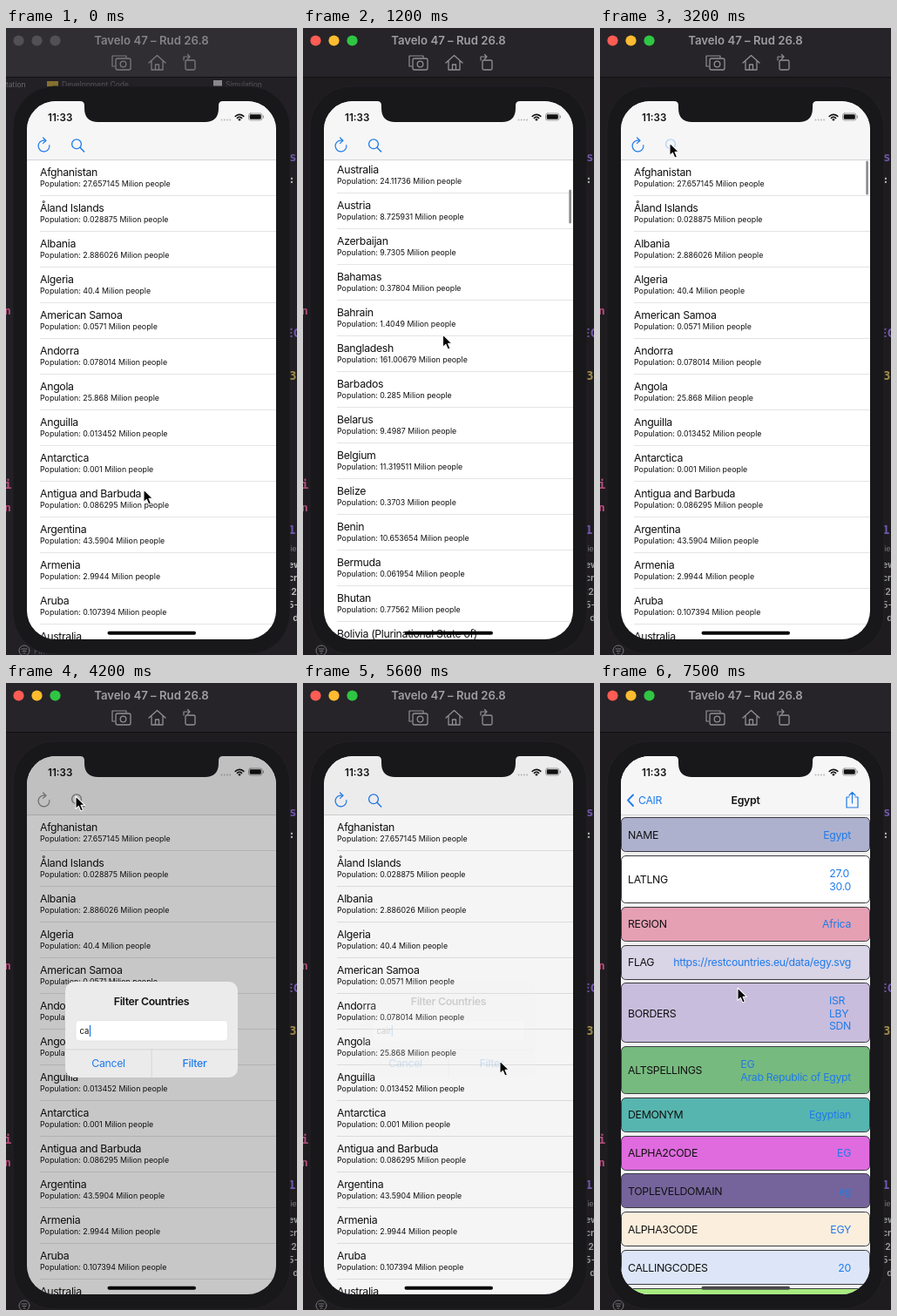
Recreate the animation shown at these times as an HTML page with a canvas. Size 334 by 720 pixels, loop 8 s.

```html
<!DOCTYPE html>
<html lang="en">
<head>
<meta charset="utf-8">
<title>Country list</title>
<style>
html, body { margin: 0; width: 100%; height: 100%; overflow: hidden; background: #1c1c1e; }
canvas { display: block; width: 334px; height: 720px; }
</style>
</head>
<body>
<canvas id="stage"></canvas>
<script>
const W = 334, H = 720, LOOP = 8000;
const canvas = document.getElementById('stage');
const ctx = canvas.getContext('2d');
const dpr = window.devicePixelRatio || 1;
canvas.width = W * dpr;
canvas.height = H * dpr;

const SANS = 'Inter, "Noto Sans", sans-serif';
const MONO = '"DejaVu Sans Mono", monospace';
const BLUE = '#1f7bea', ROW = 41, TOP = 152;

const countries = `Afghanistan|27.657145
Åland Islands|0.028875
Albania|2.886026
Algeria|40.4
American Samoa|0.0571
Andorra|0.078014
Angola|25.868
Anguilla|0.013452
Antarctica|0.001
Antigua and Barbuda|0.086295
Argentina|43.5904
Armenia|2.9944
Aruba|0.107394
Australia|24.11736
Austria|8.725931
Azerbaijan|9.7305
Bahamas|0.37804
Bahrain|1.4049
Bangladesh|161.00679
Barbados|0.285
Belarus|9.4987
Belgium|11.319511
Belize|0.3703
Benin|10.653654
Bermuda|0.061954
Bhutan|0.77562
Bolivia (Plurinational State of)|10.985059
Bonaire, Sint Eustatius and Saba|0.017408
Bosnia and Herzegovina|3.531159
Botswana|2.141206
Bouvet Island|0.0
Brazil|206.135893
British Indian Ocean Territory|0.003
United States Minor Outlying Islands|0.0003
Virgin Islands (British)|0.028514
Virgin Islands (U.S.)|0.114743
Brunei Darussalam|0.4119
Bulgaria|7.153784`.split('\n').map(line => line.split('|'));
const matches = [['Egypt', '91.29'], ['Pitcairn', '5.6e-05']];

// label, fill, value lines
const details = [
  ['NAME', '#aeb1ce', 'Egypt'],
  ['LATLNG', '#ffffff', '27.0', '30.0'],
  ['REGION', '#e5a0b3', 'Africa'],
  ['FLAG', '#d9d4e6', 'https://restcountries.eu/data/egy.svg'],
  ['BORDERS', '#c9bddd', 'ISR', 'LBY', 'SDN'],
  ['ALTSPELLINGS', '#77ba7f', 'EG', 'Arab Republic of Egypt'],
  ['DEMONYM', '#57b5af', 'Egyptian'],
  ['ALPHA2CODE', '#df6bde', 'EG'],
  ['TOPLEVELDOMAIN', '#75649b', '.eg'],
  ['ALPHA3CODE', '#fceedd', 'EGY'],
  ['CALLINGCODES', '#dce6f8', '20'],
  ['CAPITAL', '#a8ec80', 'Cairo']
];

const span = (from, to) => Array.from({ length: (to - from) / 200 + 1 }, (_, i) => from + i * 200);
const holds = [0, 200, 270, ...span(800, 1600), 1700, 2270, ...span(2600, 3600), 3770, ...span(4000, 7200), 7370, 7500];

const tracks = {
  x: [[0, 158], [800, 160], [1000, 162], [1200, 160.5], [2270, 160], [2600, 158], [2800, 150], [3000, 112], [3200, 80],
      [4600, 80], [4800, 125], [5000, 190], [5200, 226], [6000, 226], [6400, 192], [6800, 161], [7200, 160], [7500, 158]],
  y: [[0, 530], [270, 530], [800, 520], [1000, 440], [1200, 352], [1700, 340], [2270, 340], [2600, 400], [2800, 470],
      [3000, 270], [3200, 132], [4200, 130], [4600, 130], [4800, 230], [5000, 370], [5200, 434], [6000, 434],
      [6400, 310], [6800, 180], [7000, 180], [7200, 200], [7500, 350]],
  scroll: [[800, 0], [1000, 190], [1200, 536], [1400, 720], [1600, 800], [1700, 815], [2270, 815], [2600, 560], [2800, 160], [3000, 0]],
  bar: [[800, 0], [1000, 1], [2270, 1], [3200, 1], [3400, 0]],
  alert: [[3400, 0], [3600, .7], [3770, 1], [5200, 1], [5400, .5], [5600, .17], [5800, 0]],
  push: [[7000, 0], [7200, .45], [7370, .93], [7500, 1]]
};

function at(track, t) {
  const next = track.findIndex(key => key[0] > t);
  if (next === 0) return track[0][1];
  if (next < 0) return track[track.length - 1][1];
  const [t0, a] = track[next - 1], [t1, b] = track[next];
  return a + (b - a) * (t - t0) / (t1 - t0);
}

function text(str, x, y, size, color = '#111', { align = 'left', weight = 400, track = 0, font = SANS } = {}) {
  ctx.font = `${weight} ${size}px ${font}`;
  ctx.letterSpacing = track + 'px';
  ctx.textAlign = align;
  ctx.fillStyle = color;
  ctx.fillText(str, x, y);
  return ctx.measureText(str).width;
}
const body = (str, x, y, color, align, weight) => text(str, x, y, 12.3, color, { align, weight, track: -.31 });

function rect(x, y, w, h, color) {
  ctx.fillStyle = color;
  ctx.fillRect(x, y, w, h);
}
function rounded(x, y, w, h, r, fill, stroke, line = 1) {
  ctx.beginPath();
  ctx.roundRect(x, y, w, h, r);
  if (fill) { ctx.fillStyle = fill; ctx.fill(); }
  if (stroke) { ctx.strokeStyle = stroke; ctx.lineWidth = line; ctx.stroke(); }
}
function disc(x, y, r, color) {
  ctx.beginPath();
  ctx.arc(x, y, r, 0, Math.PI * 2);
  ctx.fillStyle = color;
  ctx.fill();
}
function arc(x, y, r, color, line = 1.2, from = 0, to = Math.PI * 2) {
  ctx.beginPath();
  ctx.arc(x, y, r, from, to);
  ctx.strokeStyle = color;
  ctx.lineWidth = line;
  ctx.stroke();
}
function path(d, color, line = 1.2, fill) {
  const p = new Path2D(d);
  if (fill) { ctx.fillStyle = fill; ctx.fill(p); }
  if (color) { ctx.strokeStyle = color; ctx.lineWidth = line; ctx.stroke(p); }
}
function layer(draw, alpha = 1) {
  ctx.save();
  ctx.globalAlpha *= alpha;
  draw();
  ctx.restore();
}

function drawDesktop(active) {
  rect(0, 0, W, H, active ? '#1e1c1f' : '#222024');
  if (!active) {
    text('tation', 0, 68, 8.5, '#6a686c');
    rect(47, 61, 13, 8, '#85702e');
    text('Development Code', 64, 68, 8.5, '#555357');
    rect(238, 60, 10, 8, '#89878c');
    text('Simulation', 252, 68, 8.5, '#555357');
    text('Filter', 32, 719, 9, '#5a585c');
  }
  const code = { weight: 700, font: MONO };
  const pink = '#b34d7d', purple = '#7257ad';
  text('n', -2, 329, 13, pink, code);
  text('i', -2, 529, 14, pink, code);
  text('n', -2, 555, 13, pink, code);
  text('s', 325, 153, 14, purple, code);
  text(':', 324, 178, 13, '#aaa', code);
  text('EC', 321, 355, 14, purple, code);
  text('3', 325, 404, 14, '#a08c4a', code);
  text('1', 324, 581, 14, purple, code);
  const note = active ? '#a09fa2' : '#c4c3c6';
  text('lie', 324, 601, 9, '#77757a');
  ['ew', 'cr', ':2', '5-', '  d'].forEach((s, i) => text(s, 324, 620 + i * 15.3, 10.5, note, { weight: 600 }));

  arc(21, 715, 6, '#77757a', 1);
  path('M18 713H24 M19 715.5H23 M20 718H22', '#77757a', 1);
}

function drawTitleBar(active) {
  rect(0, 0, W, 56, active ? '#262428' : '#302e32');
  rect(0, 56, W, 1, '#111013');
  const lights = active ? ['#ff5c54', '#fdbc30', '#2fc643'] : ['#525053', '#525053', '#525053'];
  lights.forEach((color, i) => disc(14.5 + i * 21, 14.5, 6.1, color));
  text('Tavelo 47 – Rud 26.8', 167, 19, 13.2, active ? '#a09ea2' : '#858387', { align: 'center', weight: 600 });
  const gray = active ? '#918f93' : '#7b797d';
  path('M125 44H122V32H138V34', gray);
  rounded(126, 35, 17, 13, 2, null, gray, 1.3);
  arc(134.5, 41.5, 3.3, gray, 1.3);
  path('M164 40L173.5 31.5L183 40 M167 38V48H180V38 M171.5 48V42H175.5V48', gray, 1.3);
  rounded(206, 37, 11, 11, 1.5, null, gray, 1.3);
  path('M204 37V33H211 M208.5 30.5L211 33L208.5 35.5', gray, 1.2);
}

function drawRefresh(color) {
  arc(43.5, 135.5, 6.4, color, 1.2, -.15, Math.PI * 1.55);
  path('M42.5 126L46 129.2L42.5 132.4', color);
}
function drawSearch(color) {
  arc(81, 133.3, 5.4, color, 1.3);
  path('M85 137.3L89.7 142', color, 1.5);
}

function drawList(s) {
  rect(24, 84, 286, 618, '#fff');
  const rows = s.filtered ? matches : countries;
  layer(() => {
    ctx.beginPath();
    ctx.rect(24, TOP, 286, 551);
    ctx.clip();
    for (let i = Math.floor(s.scroll / ROW), end = i + 15; i < end; i++) {
      const y = TOP + i * ROW - s.scroll;
      if (s.pressed && i === 0) rect(24, y, 286, ROW, '#d4d4d7');
      rect(39, y + ROW - 1, 271, 1, '#e4e4e5');
      if (!rows[i]) continue;
      body(rows[i][0], 39, y + 17.5, '#111');
      text(`Population: ${rows[i][1]} Milion people`, 39, y + 30.2, 8.85, '#111');
    }
    layer(() => rounded(305.3, 152.5 + s.scroll * .0617, 2.6, 39, 1.3, '#8b8b8d'), s.bar);
  });
  rect(24, 84, 286, 67, '#f6f6f7');
  rect(24, 151, 286, 1, '#d4d4d6');
  const tint = s.alert > .5 ? '#8a8a8c' : BLUE;
  drawRefresh(tint);
  layer(() => drawSearch(tint), s.searchPressed ? .3 : 1);
  if (s.filtered) body('CAIR', 167, 139.3, '#111', 'center', 600);
}

function drawDetail() {
  rect(24, 84, 286, 618, '#f1f1f2');
  let y = 154.3;
  for (const [label, fill, ...lines] of details) {
    const h = 25.6 + lines.length * 14.5;
    rounded(24.5, Math.round(y) + .5, 285, Math.round(h) - 1, 5, fill, '#3b3b40');
    const mid = y + h / 2 + 4.7;
    const width = body(label, 32, mid, '#111') && Math.max(...lines.map(line => ctx.measureText(line).width));
    lines.forEach((line, i) => body(line, 288 - width, mid + (i - (lines.length - 1) / 2) * 14.6, BLUE));
    y += h + 3.8;
  }
  rect(24, 84, 286, 67, '#f6f6f7');
  rect(24, 151, 286, 1, '#d4d4d6');
  path('M38 128.5L32 134.7L38 141', BLUE, 1.9);
  body('CAIR', 44, 139.3, BLUE);
  body('Egypt', 167, 139.3, '#111', 'center', 600);
  path('M286 131H283V143H296V131H293 M289.5 138V126 M286 129L289.5 125.5L293 129', BLUE);
}

function drawStatus() {
  text('11:33', 48, 106.5, 11.6, '#111', { weight: 600 });
  for (let i = 0; i < 4; i++) disc(247.5 + i * 3.2, 105.5, .9, '#b5b5b7');
  for (const r of [3.6, 6.6]) arc(268, 106, r, '#111', 1.6, -Math.PI * .76, -Math.PI * .24);
  disc(268, 105.3, 1.3, '#111');
  rounded(278.5, 98, 15.5, 8, 2.3, null, '#88888a', .8);
  rounded(279.7, 99.2, 13.1, 5.6, 1.3, '#111');
  rect(294.8, 100.5, 1, 3, '#88888a');
}

function drawAlert(s) {
  if (s.alert <= 0) return;
  rect(24, 84, 286, 618, `rgba(0,0,0,${.22 * s.alert})`);
  const zoom = s.t < 3770 ? 1.15 - .15 * s.alert : 1;
  layer(() => {
    ctx.translate(167, 398);
    ctx.scale(zoom, zoom);
    ctx.translate(-167, -398);
    rounded(68, 343, 198, 110, 10, '#ebebec');
    body('Filter Countries', 167, 370.3, '#111', 'center', 600);
    rounded(80, 387.5, 174.5, 23.5, 4, '#fff', '#dcdcde', .6);
    const typed = text(s.query, 84.5, 403, 9.5, '#111');
    rect(85 + typed, 393, 1.3, 13, BLUE);
    rect(68, 420.5, 198, .8, '#cfcfd1');
    rect(166.7, 420.5, .8, 32.5, '#cfcfd1');
    if (s.t >= 5200 && s.t < 5600) rect(167.5, 421.3, 98.5, 31, '#dcdcde');
    body('Cancel', 117.5, 441.2, BLUE, 'center');
    body('Filter', 216.5, 441.2, BLUE, 'center', 500);
  }, s.alert);
}

function drawPhone(s) {
  rounded(8, 67, 318, 652, 47, '#18171a', '#222124');
  layer(() => {
    ctx.beginPath();
    ctx.roundRect(24, 84, 286, 618, 33);
    ctx.clip();
    layer(() => {
      ctx.translate(-86 * s.push, 0);
      drawList(s);
    });
    if (s.push > 0) {
      rect(24, 84, 286, 618, `rgba(0,0,0,${.1 * s.push})`);
      layer(() => {
        ctx.translate(286 * (1 - s.push), 0);
        drawDetail();
      });
    }
    drawStatus();
    rounded(116.5, 692.7, 101.5, 4, 2, s.push > .5 ? '#48484a' : '#050505');
    drawAlert(s);
    path('M85 83V84Q90 84 90 89V92Q90 108 106 108H228Q244 108 244 92V89Q244 84 249 84V83Z', null, 0, '#18171a');
  });
}

function drawCursor(x, y) {
  layer(() => {
    ctx.translate(x, y);
    path('M0 0V14.5L3.4 11.4L5.8 17L8.4 15.9L6 10.4H10.5Z', '#f4f4f4', 1.1, '#050505');
  });
}

function draw(time) {
  const t = holds.filter(h => h <= time).pop();
  const s = { t };
  for (const name in tracks) s[name] = at(tracks[name], t);
  s.query = 'cair'.slice(0, Math.max(0, Math.floor((t - 3800) / 200)));
  s.filtered = t >= 6000;
  s.pressed = t >= 7000;
  s.searchPressed = t >= 3200 && t < 3600;
  const active = t >= 200;
  ctx.setTransform(dpr, 0, 0, dpr, 0, 0);
  ctx.lineCap = ctx.lineJoin = 'round';
  drawDesktop(active);
  drawTitleBar(active);
  drawPhone(s);
  drawCursor(s.x, s.y);
}

const start = performance.now();
function tick() {
  draw((performance.now() - start) % LOOP);
  requestAnimationFrame(tick);
}
tick();
</script>
</body>
</html>
```
